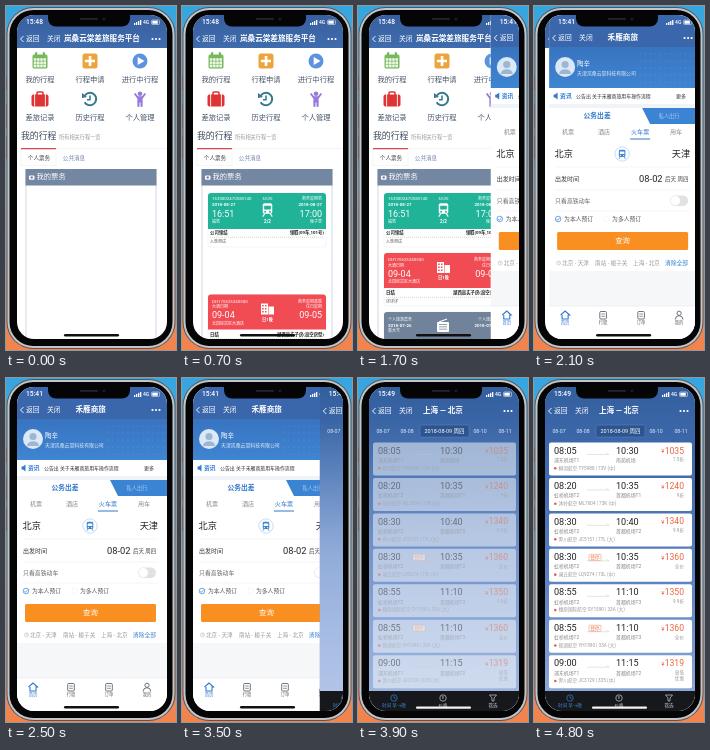
An HTML page with a canvas that plays this animation: 170x344 px, repeating every 4900 ms.

```html
<!DOCTYPE html>
<html lang="zh-CN">
<head>
<meta charset="utf-8">
<style>
html, body { margin: 0; width: 100%; height: 100%; overflow: hidden; }
canvas { display: block; width: 170px; height: 344px; }
</style>
</head>
<body>
<canvas></canvas>
<script>
const LOOP = 4900, W = 170, H = 344;
const SCREEN = { x: 11, y: 9, w: 150, h: 324 };
const FONT = 'Roboto, "Noto Sans CJK SC", "Noto Sans CJK", sans-serif';
const canvas = document.querySelector('canvas');
const c = canvas.getContext('2d');
const dpr = window.devicePixelRatio || 1;
canvas.width = W * dpr;
canvas.height = H * dpr;

const progress = (t, from, to) => Math.min(1, Math.max(0, (t - from) / (to - from)));

function text(s, x, y, size, color = '#333', align = 'left', weight = 400) {
  c.font = `${weight} ${size}px ${FONT}`;
  c.fillStyle = color;
  c.textAlign = align;
  c.textBaseline = 'middle';
  c.fillText(s, x, y);
  return c.measureText(s).width;
}
function rect(x, y, w, h, fill, r = 0) {
  c.fillStyle = fill;
  c.beginPath();
  c.roundRect(x, y, w, h, r);
  c.fill();
}
function frame(x, y, w, h, color, r = 0, width = 0.7) {
  c.strokeStyle = color;
  c.lineWidth = width;
  c.beginPath();
  c.roundRect(x, y, w, h, r);
  c.stroke();
}
function disc(x, y, r, fill) {
  c.fillStyle = fill;
  c.beginPath();
  c.arc(x, y, r, 0, 7);
  c.fill();
}
function path(points, color, width = 0.7, fill = false) {
  c.beginPath();
  for (let i = 0; i < points.length; i += 2) c.lineTo(points[i], points[i + 1]);
  if (fill) {
    c.fillStyle = color;
    c.fill();
  } else {
    c.strokeStyle = color;
    c.lineWidth = width;
    c.stroke();
  }
}
function ring(x, y, r, color, width = 0.7, from = 0, to = 7) {
  c.strokeStyle = color;
  c.lineWidth = width;
  c.beginPath();
  c.arc(x, y, r, from, to);
  c.stroke();
}
function gradient(y0, y1, ...colors) {
  const g = c.createLinearGradient(0, y0, 0, y1);
  colors.forEach((color, i) => g.addColorStop(i / (colors.length - 1), color));
  return g;
}
function train(x, y, s, color, hole) {
  rect(x - 5 * s, y - 7 * s, 10 * s, 11 * s, color, 2 * s);
  rect(x - 3.5 * s, y - 4.5 * s, 7 * s, 4 * s, hole);
  disc(x - 2.5 * s, y + 1.8 * s, s, hole);
  disc(x + 2.5 * s, y + 1.8 * s, s, hole);
  path([x - 3 * s, y + 4 * s, x - 5 * s, y + 7 * s], color, 1.2 * s);
  path([x + 3 * s, y + 4 * s, x + 5 * s, y + 7 * s], color, 1.2 * s);
}

function navigation(clock, title, x, y) {
  text(clock, 20, 16, 6.7, '#fff', 'left', 500);
  for (let i = 0; i < 4; i++) rect(128 + i * 2, 18 - i - 1, 1.3, i + 2, '#fff');
  text('4G', 137, 16.3, 5, '#fff', 'left', 500);
  frame(145.5, 14, 8, 4.5, '#fff', 1, 0.5);
  rect(146.3, 14.8, 5.5, 2.9, '#fff');
  path([17.5, y - 3, 14.5, y, 17.5, y + 3], '#fff', 0.9);
  text('返回', 20, y, 6.8, '#fff');
  text('关闭', 41, y, 6.8, '#fff');
  text(title, x, y, 7.6, '#fff', 'left', 600);
  for (let i = 0; i < 3; i++) disc(146.5 + i * 3.5, y, 1.1, '#fff');
}

// Menu symbols, drawn around their own centre
const symbols = [
  () => {
    rect(-7.5, -6.5, 15, 14, '#76b95c', 1.5);
    rect(-5, -9, 2.2, 4, '#76b95c', 1);
    rect(2.8, -9, 2.2, 4, '#76b95c', 1);
    for (let i = 0; i < 12; i++) rect(-6.2 + i % 4 * 3.2, -2.8 + (i >> 2) * 3.2, 2.6, 2.6, '#eff8eb');
  },
  () => {
    rect(-7.5, -7.5, 15, 15, '#eda43b', 2.5);
    rect(-5, -1.3, 10, 2.6, '#fff');
    rect(-1.3, -5, 2.6, 10, '#fff');
  },
  () => {
    disc(0, 0, 7.5, '#5b93dc');
    path([-2.3, -4, 4.5, 0, -2.3, 4], '#fff', 1, true);
  },
  () => {
    rect(-8.5, -4.5, 17, 12, '#de3435', 2);
    frame(-3, -7, 6, 4, '#de3435', 1, 1.6);
    rect(-5.8, -4.5, 0.9, 12, '#fff');
    rect(4.9, -4.5, 0.9, 12, '#fff');
  },
  () => {
    ring(0, 0, 6.2, '#34788b', 2, -2.7, 2.6);
    path([-8, -6, -8, -1, -3, -2], '#34788b', 1, true);
    path([0, -3.5, 0, 0.8, -3, 0.8], '#34788b', 1.5);
  },
  () => {
    disc(0, -5.3, 2.3, '#967bd8');
    path([-5.3, -5.5, -2.3, -1.5, 2.3, -1.5, 5.3, -5.5], '#967bd8', 1.9);
    rect(-2.6, -2.4, 5.2, 6, '#967bd8', 1);
    rect(-2.6, 2, 2.1, 6, '#967bd8', 1);
    rect(0.5, 2, 2.1, 6, '#967bd8', 1);
  }
];

function ticket(y, color, height, lines) {
  rect(26, y, 118, height + 18, '#fff', 3);
  frame(26, y, 118, height + 18, '#dde3ea', 3, 0.4);
  rect(26, y, 118, height, color, [3, 3, 0, 0]);
  for (const [s, dy, size, side = 0, weight = 400] of lines)
    text(s, [30, 85.5, 140][side], y + dy, size, '#fff', ['left', 'center', 'right'][side], weight);
}
function ticketFooter(y, left, right, note) {
  text(left, 28, y, 4.4, '#222', 'left', 600);
  text(right, 142, y, 4.4, '#222', 'right', 600);
  c.setLineDash([1, 1]);
  path([28, y + 4.3, 142, y + 4.3], '#aaa', 0.5);
  c.setLineDash([]);
  text(note, 28, y + 8.5, 4, '#555');
}
function tickets(t) {
  const rise = (end, from, to) => 335 + (end - 335) * progress(t, from, to);
  let y = rise(187, 340, 690);
  ticket(y, '#20b397', 36, [
    ['1630002470580140', 6, 4.4], ['2018-08-27', 11.7, 4.4, 0, 700], ['16:51', 21, 9], ['福新', 29, 4],
    ['6535', 6, 4.4, 1], ['2/2', 29, 4.6, 1, 600],
    ['商务星期新', 6, 4, 2], ['2018-08-27', 11.7, 4.4, 2, 700], ['17:00', 21, 9, 2], ['陵子里', 29, 4, 2]
  ]);
  train(85.5, y + 17, 0.95, '#fff', '#20b397');
  ticketFooter(y + 40, '公司领结', '领取(09车,101号)', '入款测试');

  y = rise(247, 590, 800);
  ticket(y, '#f14b53', 35, [
    ['DH170625340500', 7, 4.4], ['大酒日期', 12.5, 4], ['09-04', 21, 9], ['北园经贸区大酒店', 29, 4],
    ['日1晚', 25, 4.2, 1, 600],
    ['商务星期政策', 7, 4, 2], ['住日星期', 12.5, 4, 2], ['09-05', 21, 9, 2]
  ]);
  rect(79, y + 9, 7, 11, '#fff');
  rect(86.5, y + 12, 5.5, 8, '#fff');
  for (let i = 0; i < 6; i++) rect(80.2 + i % 2 * 2.8, y + 10.5 + (i >> 1) * 3, 1.5, 1.5, '#f14b53');
  ticketFooter(y + 40, '日结', '湖西高实子房(高空房型)', '详详详');

  y = rise(306, 790, 900);
  ticket(y, '#70839b', 40, [
    ['个人旅游票务', 8, 4], ['2018-07-26', 13.5, 4.4, 0, 700], ['重大号', 19, 4],
    ['个人旅游票', 8, 4, 2], ['2018-07-27', 13.5, 4.4, 2, 700]
  ]);
  rect(79, y + 10, 12, 10, '#fff', 1);
  path([81, y + 10, 89, y + 7], '#fff', 1.2);
  for (let i = 0; i < 3; i++) rect(81, y + 12 + i * 2.4, 8, 0.8, '#70839b');
}

function homePage(t) {
  rect(11, 9, 150, 324, '#fff');
  rect(11, 9, 150, 33, gradient(9, 42, '#375f9f', '#3f6cad'));
  navigation('15:48', '岚桑云棠差旅服务平台', 58, 33);
  ['我的行程', '行程申请', '进行中行程', '差旅记录', '历史行程', '个人管理'].forEach((label, i) => {
    const x = 34 + i % 3 * 50, y = i < 3 ? 55 : 93;
    c.save();
    c.translate(x, y);
    symbols[i]();
    c.restore();
    text(label, x, y + 19.2, 7.3, '#46566b', 'center');
  });
  text('我的行程', 15, 130.5, 8.9, '#3f4a59');
  text('所有相关行程一览', 53, 131.5, 5.2, '#999');
  path([15, 142.5, 161, 142.5], '#e3e7ec', 0.5);
  frame(15, 142.5, 35, 17, '#e8ebef', 0, 0.5);
  rect(15, 142, 35, 1.2, '#d84552');
  text('个人票务', 33, 152, 5.6, '#444', 'center', 500);
  text('公共消息', 68, 152, 5.6, '#6d82a0', 'center');
  frame(20, 163.5, 130, 180, '#b9c5da', 0, 0.7);
  rect(19.5, 163, 131, 16.5, '#7487a2');
  rect(23, 169.5, 5.5, 4.2, '#fff', 1);
  disc(25.7, 171.5, 1.2, '#7487a2');
  text('我的票务', 30.5, 171.3, 7.3, '#fff');
  c.save();
  c.beginPath();
  c.rect(25, 186, 120, 148);
  c.clip();
  tickets(t);
  c.restore();
  rect(58, 328, 55, 2.4, '#111', 1.2);
}

function bookingPage() {
  rect(11, 9, 150, 324, '#fff');
  rect(11, 9, 150, 32, '#3a66ab');
  rect(11, 41, 150, 41, gradient(41, 82, '#3874c0', '#3e85d2'));
  for (let i = 0; i < 60; i++) disc(102 + i % 12 * 5, 48 + (i / 12 | 0) * 7, 0.5, 'rgba(255,255,255,.2)');
  navigation('15:41', '禾雁商旅', 69.5, 32);
  disc(27, 61, 10, '#dbe8f6');
  disc(27, 58.5, 3.6, '#9fb6d2');
  c.fillStyle = '#9fb6d2';
  c.beginPath();
  c.ellipse(27, 68, 6, 4.8, 0, Math.PI, 0);
  c.fill();
  text('陶辛', 39, 58, 6.5, '#fff');
  text('天津岚桑云棠科技有限公司', 39, 68, 4.9, '#e3edf9');

  path([15.5, 88.5, 17, 88.5, 19.5, 86.5, 19.5, 93.5, 17, 91.5, 15.5, 91.5], '#3079d2', 1, true);
  text('资讯', 22, 90.2, 5.8, '#3079d2', 'left', 700);
  text('公告出 关于禾雁商旅用车操作流程', 38, 90.2, 4.9, '#333');
  text('更多', 138, 90.2, 5, '#333');
  rect(11, 98, 150, 4, '#f0f3f7');
  path([104, 102, 161, 102, 161, 118, 112, 118], '#3b83d3', 1, true);
  text('公务出差', 59, 109.5, 6.8, '#3178cb', 'center', 600);
  text('私人出行', 131, 110, 5.2, '#a9cdf3', 'center');
  ['机票', '酒店', '火车票', '用车'].forEach((label, i) =>
    text(label, 30 + i * 36, 126, 6.1, i === 2 ? '#3178cb' : '#888', 'center'));
  rect(92, 132.5, 20, 1, '#3178cb');
  text('北京', 16.5, 148.5, 9.2, '#222');
  text('天津', 152, 148.5, 9.2, '#222', 'right');
  ring(84, 148, 7.2, '#b9d5f4', 0.8);
  train(84, 148.4, 0.65, '#3b83d3', '#fff');
  for (const y of [161, 184, 205]) path([17, y, 152, y], '#e8e8e8', 0.5);
  text('出发时间', 17, 173, 6, '#333');
  text('08-02', 101, 173, 9.3, '#222');
  text('后天 周四', 127, 173.3, 5.5, '#444');
  text('只看高铁动车', 17, 195, 5.9, '#666');
  rect(132, 189.5, 18, 10.5, '#e2e2e4', 5.25);
  disc(137.3, 194.7, 4.7, '#fff');
  ring(20, 213, 2.8, '#3b83d3', 0.7);
  path([18.4, 213, 19.6, 214.4, 21.8, 211.6], '#3b83d3', 0.7);
  text('为本人预订', 26, 213, 5.8, '#555');
  ring(68.5, 213, 2.8, '#eee', 0.5);
  text('为多人预订', 74, 213, 5.8, '#555');
  rect(19, 226, 131, 18, '#f98f20', 1.5);
  text('查询', 84.5, 235, 7.4, '#fff', 'center');
  ring(20.5, 257, 2, '#aaa', 0.5);
  path([20.5, 255.8, 20.5, 257, 21.4, 257], '#aaa', 0.5);
  text('北京 - 天津', 24, 257, 5.6, '#999');
  text('南站 - 梭子关', 57, 257, 5.6, '#999');
  text('上海 - 北京', 95, 257, 5.6, '#999');
  text('清除全部', 150, 257, 5.8, '#3b83d3', 'right');

  rect(11, 265, 150, 35, '#f5f7f9');
  path([11, 300, 161, 300], '#dde1e6', 0.5);
  ['首页', '行程', '订单', '我的'].forEach((label, i) => {
    const x = 27 + i * 38, color = i ? '#5f646c' : '#3079d2';
    if (i === 0) path([x - 4.5, 309, x, 305, x + 4.5, 309, x + 3, 309, x + 3, 313, x - 3, 313, x - 3, 309], color, 1.1);
    else if (i < 3) {
      frame(x - 3.3, 305.5, 6.6, 7.5, color, 1, 0.9);
      path([x - 1.8, 308, x + 1.8, 308], color);
      path([x - 1.8, 310.3, x + 1.8, 310.3], color);
    } else {
      ring(x, 307.3, 2.1, color, 0.9);
      ring(x, 313.5, 3.8, color, 0.9, Math.PI, 0);
    }
    text(label, x, 317, 4.3, color, 'center');
  });
  rect(58, 328, 55, 2.4, '#111', 1.2);
}

// departure, airport, arrival, arrival airport, flight, price, discount, stopover
const flights = [
  ['08:05', '浦东机场T1', '10:30', '南苑机场', '桐羽航空 TY5988 | 73V (中)', 1035, '7.5折'],
  ['08:20', '虹桥机场T2', '10:35', '首都机场T1', '沐岭航空 ML7604 | 73K (中)', 1240, '9折'],
  ['08:30', '虹桥机场T2', '10:40', '首都机场T2', '霁川航空 JC5151 | 77L (大)', 1340, '9.9折'],
  ['08:30', '虹桥机场T2', '10:35', '首都机场T2', '澜丘航空 LQ9274 | 73L (中)', 1360, '全价', true],
  ['08:55', '虹桥机场T2', '11:10', '首都机场T3', '穗原国际航空 SY1590 | 33A (大)', 1350, '9.9折'],
  ['08:55', '虹桥机场T2', '11:10', '首都机场T3', '砚湖航空 YH1590 | 33A (大)', 1360, '全价', true],
  ['09:00', '浦东机场T1', '11:15', '首都机场T2', '霁川航空 JC3129 | 325 (中)', 1319, '高低']
];
function flight([depart, from, arrive, to, name, price, rate, stop], i) {
  const y = 73 + i * 35.45;
  rect(15, y - 8.5, 143, 33, '#fff', 2);
  text(depart, 20, y, 9.1, '#222');
  text(from, 20, y + 9.5, 4.9, '#888');
  disc(21.3, y + 17.3, 1.3, '#dc6258');
  text(name, 24.5, y + 17.3, 4.7, '#999');
  text(arrive, 82, y, 9.1, '#222');
  text(to, 82, y + 9.5, 4.9, '#888');
  path([53, y + 3.5, 75, y + 3.5, 72.5, y + 2], '#c8c8c8', 0.5);
  if (stop) {
    rect(55, y - 3, 12, 6.2, '#fff');
    frame(55, y - 3, 12, 6.2, '#eb8b66', 0.5, 0.5);
    text('经停', 61, y + 0.2, 4.5, '#e87146', 'center');
  }
  const width = text(price, 150, y, 8.6, '#e9653c', 'right');
  text('¥', 149.6 - width, y + 0.7, 6, '#e9653c', 'right');
  text(rate, 150, y + 9, 4.6, '#999', 'right');
  if (i === 6) text('优惠', 150, y + 15, 4.6, '#999', 'right');
}
function flightsPage(t) {
  const shown = progress(t, 3700, 4100);
  rect(11, 9, 150, 324, gradient(9, 313, '#345f9f', '#436fb1', '#5f86c4', '#8ba8d6'));
  c.save();
  c.globalAlpha = 1 - shown;
  rect(11, 41, 150, 272, gradient(41, 313, 'rgba(186,203,236,0)', 'rgba(186,203,236,.6)', 'rgba(186,203,236,.8)'));
  c.restore();
  navigation('15:49', '上海 — 北京', 65, 33);
  rect(62, 47, 49, 12, '#2e548f', 1);
  frame(62, 47, 49, 12, '#5d85bf', 1, 0.5);
  text('2018-08-09 周四', 86.5, 53, 5.5, '#fff', 'center');
  [['08-07', 25], ['08-08', 49], ['08-10', 122], ['08-11', 147]].forEach(([day, x]) =>
    text(day, x, 53, 5.2, '#e4edfa', 'center'));
  c.save();
  c.globalAlpha = shown;
  flights.forEach(flight);
  c.restore();
  rect(11, 313, 150, 20, '#17181c');
  ring(36, 320, 3.2, '#3f82cc');
  path([36, 318, 36, 320, 37.7, 320.8], '#3f82cc');
  text('时间 早→晚', 36, 327.3, 4.5, '#3f82cc', 'center');
  ring(85, 320, 3.2, '#c9ccd2');
  text('¥', 85, 320.2, 4.4, '#c9ccd2', 'center');
  text('价格', 85, 327.3, 4.5, '#c9ccd2', 'center');
  path([131.5, 317, 138.5, 317, 136, 320, 136, 323, 134, 323, 134, 320, 131.5, 317], '#c9ccd2');
  text('筛选', 135, 327.3, 4.5, '#c9ccd2', 'center');
  rect(58, 328.5, 55, 2.2, '#f4f4f4', 1);
}

function phone() {
  rect(0, 0, W, H, gradient(0, H, '#35a5df', '#80b7cf', '#f4824a'));
  for (const [y, h] of [[70, 14], [98, 24], [129, 24]]) rect(0, y, 2, h, '#77797e', 1);
  rect(0.5, 1, 169, 342, '#55565b', 27);
  rect(1.5, 2, 167, 340, '#c3c5c9', 26);
  rect(3.5, 4, 163, 336, '#050506', 24);
}

function draw(now) {
  const t = now % LOOP;
  c.setTransform(dpr, 0, 0, dpr, 0, 0);
  phone();
  c.save();
  c.beginPath();
  c.roundRect(SCREEN.x, SCREEN.y, SCREEN.w, SCREEN.h, 17);
  c.clip();
  const pages = [[homePage, -1, 0], [bookingPage, 1605, 2115], [flightsPage, 3428, 3900]];
  for (const [page, from, to] of pages) {
    if (t < from) continue;
    c.save();
    c.translate(SCREEN.w * (1 - progress(t, from, to)), 0);
    page(t);
    c.restore();
  }
  c.restore();
  rect(42, 5, 82, 15.5, '#050506', [0, 0, 8, 8]);
  rect(74, 12, 18, 1.8, '#25262a', 1);
  disc(98, 13, 1.6, '#171d2b');
  requestAnimationFrame(draw);
}
requestAnimationFrame(draw);
</script>
</body>
</html>
```
